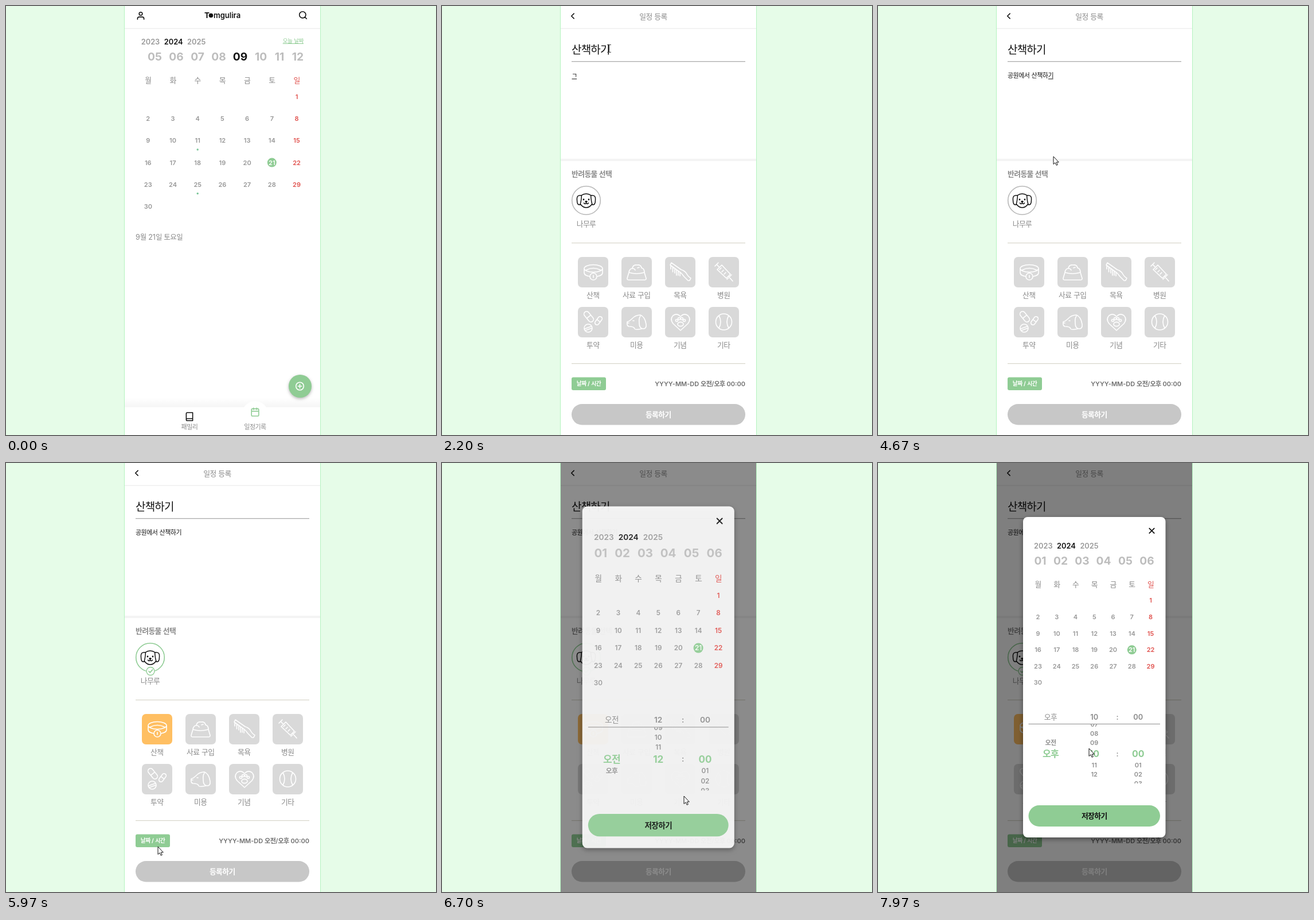
An HTML page with a canvas that plays this animation: 750 px wide and 747 px high, repeating every 8000 ms.

```html
<!DOCTYPE html>
<html lang="ko">
<head>
<meta charset="utf-8">
<title>일정 등록</title>
<style>
html, body { margin: 0; width: 100%; height: 100%; overflow: hidden; background: #e6fce8; }
canvas { display: block; width: 750px; height: 747px; }
</style>
</head>
<body>
<canvas id="stage"></canvas>
<script>
const LOOP = 8000, W = 750, H = 747;
const FONT = 'Inter, "Noto Sans CJK KR", "Noto Sans CJK", "Noto Sans", sans-serif';
const GREEN = '#8fcc94', GRAY = '#8a8a8a', PALE = '#bdbdbd', RED = '#e0504c';
const canvas = document.getElementById('stage');
const ctx = canvas.getContext('2d');
const dpr = window.devicePixelRatio || 1;
canvas.width = W * dpr;
canvas.height = H * dpr;

const clamp = v => Math.max(0, Math.min(1, v));
const two = n => String(n).padStart(2, '0');

// Hangul is set a little tighter than its default advance
const runs = s => s.match(/[ㄱ-힣]+|[^ㄱ-힣]+/g) || [];
function setRun(run, size) {
  ctx.letterSpacing = /[ㄱ-힣]/.test(run) ? -0.045 * size + 'px' : '0px';
}
function setFont(size, weight) { ctx.font = `${weight} ${size}px ${FONT}`; }
function measure(s, size) {
  let w = 0;
  for (const r of runs(s)) { setRun(r, size); w += ctx.measureText(r).width; }
  return w;
}
// y is the optical middle of the line
function text(s, x, y, size, color, weight = 400, align = 'center') {
  setFont(size, weight);
  const w = measure(s, size);
  if (align === 'center') x -= w / 2;
  if (align === 'right') x -= w;
  ctx.fillStyle = color;
  for (const r of runs(s)) {
    setRun(r, size);
    ctx.fillText(r, x, y + size * 0.36);
    x += ctx.measureText(r).width;
  }
  return w;
}
function rect(x, y, w, h, color) { ctx.fillStyle = color; ctx.fillRect(x, y, w, h); }
function round(x, y, w, h, r, color) {
  ctx.beginPath(); ctx.roundRect(x, y, w, h, r);
  ctx.fillStyle = color; ctx.fill();
}
function disc(x, y, r, color) {
  ctx.beginPath(); ctx.arc(x, y, r, 0, 7);
  ctx.fillStyle = color; ctx.fill();
}
function ring(x, y, r, color, lw) {
  ctx.beginPath(); ctx.arc(x, y, r, 0, 7);
  ctx.strokeStyle = color; ctx.lineWidth = lw; ctx.stroke();
}
function line(d, x, y, color, lw, scale = 1) {
  ctx.save();
  ctx.translate(x, y); ctx.scale(scale, scale);
  ctx.lineCap = ctx.lineJoin = 'round';
  ctx.strokeStyle = color; ctx.lineWidth = lw / scale;
  ctx.stroke(new Path2D(d));
  ctx.restore();
}
const circle = (x, y, r) => `M${x - r} ${y}a${r} ${r} 0 1 0 ${2 * r} 0a${r} ${r} 0 1 0 ${-2 * r} 0`;
// 24-unit icon around its middle
const icon = (d, x, y, color) => line(d, x - 8.4, y - 8.4, color, 1.6, 0.7);

const USER = 'M20 21v-2a4 4 0 0 0-4-4H8a4 4 0 0 0-4 4v2' + circle(12, 7, 4);
const SEARCH = circle(11, 11, 8) + 'M21 21L16.7 16.7';
const BOOK = 'M4 19.5A2.5 2.5 0 0 1 6.5 17H20M6.5 2H20V22H6.5A2.5 2.5 0 0 1 4 19.5V4.5A2.5 2.5 0 0 1 6.5 2Z';
const CALENDAR = 'M5 4H19a2 2 0 0 1 2 2V20a2 2 0 0 1-2 2H5a2 2 0 0 1-2-2V6a2 2 0 0 1 2-2ZM16 2v4M8 2v4M3 10H21';
const DOG = 'M-9-9Q0-15 9-9M-8-9Q-17-11-16-1Q-16 8-11 7Q-9 4-8-9M8-9Q17-11 16-1Q16 8 11 7Q9 4 8-9' +
  'M-10 6Q-6 12 0 12Q6 12 10 6M-4 4Q-2 7 0 4Q2 7 4 4M0 1V4';

const TILES = [
  ['산책', 'M11 20A16 6.5 0 0 1 43 20A16 6.5 0 0 1 11 20V28A16 7 0 0 0 21 34M43 20V28A16 7 0 0 1 33 34' +
    'M14 23Q27 16 40 23' + circle(27, 34, 6) + 'M27 32v4'],
  ['사료 구입', 'M13 27L10 37Q9.5 40 13 40H40Q43.5 40 43 37L40 27M13 27Q14 20 19 20Q20 13 27 14' +
    'Q34 13 35 19Q40 20 40 27Q26 31 13 27M19 20Q23 20 24 23M28 19l3-1'],
  ['목욕', 'M11 10L9 14L28 28Q30 30 33 34L40 41Q43 42 44 39L45 37Q40 34 37 28Q34 24 28 22Z' +
    'M10 16v5M13.5 18v8M17 21v7M20 23v9M23 26v6M26 28v5'],
  ['병원', 'M11 16l6-6M14 13l5 5M15 22L23 14L38 30L31 37ZM35 34L42 42M40 31L32 39M19 22l3-3M23 26l3-3M27 30l3-3'],
  ['투약', 'M11.7 15.3L19.3 24.5A4.5 4.5 0 0 0 26.3 18.7L18.7 9.5A4.5 4.5 0 0 0 11.7 15.3M15.5 19.9L22.5 14.1' +
    'M36.2 29.8L41.6 22.6A3.6 3.6 0 0 0 35.8 18.2L30.4 25.4A3.6 3.6 0 0 0 36.2 29.8M33.1 21.8l5.8 4.4' +
    circle(18, 37, 7) + 'M12 38l11-4M13 41l11-4'],
  ['미용', 'M10 26Q14 25 18 21Q24 14 33 14Q41 17 43 30Q44 38 38 38Q31 38 31 28Q30 20 33 16' +
    'M10 26Q9 33 13 34Q22 34 23 38Q24 40 30 39L36 38M20 24h2M10 28h3'],
  ['기념', 'M27 41L14 29Q8 21 14 15Q21 10 27 17Q33 10 40 15Q46 21 40 29Z' + circle(20.5, 23.5, 2) +
    circle(24.6, 20.5, 2) + circle(29.4, 20.5, 2) + circle(33.5, 23.5, 2) + 'M22 30a5 3.6 0 1 0 10 0a5 3.6 0 1 0-10 0'],
  ['기타', circle(26.5, 26, 14) + 'M18 15Q24 26 18 37M35 15Q29 26 35 37']
];

// [time, text]; the last syllable stays underlined while it is composed
const TITLE = [[790, 'ㅅ'], [870, '사'], [940, '산'], [1100, '산ㅊ'], [1180, '산채'], [1260, '산책'],
  [1420, '산책ㅎ'], [1670, '산책하'], [1740, '산책하기']];
const MEMO = [[2200, 'ㄱ'], [2280, '고'], [2430, '공'], [2590, '공ㅇ'], [2750, '공워'], [2830, '공원'],
  [2990, '공원ㅇ'], [3160, '공원에'], [3230, '공원엣'], [3310, '공원에서'], [3390, '공원에서 '],
  [3470, '공원에서 사'], [3550, '공원에서 산'], [3720, '공원에서 산ㅊ'], [3870, '공원에서 산채'],
  [3950, '공원에서 산책'], [4120, '공원에서 산책ㅎ'], [4200, '공원에서 산책하'],
  [4280, '공원에서 산책학'], [4360, '공원에서 산책하기']];
const typed = (keys, t) => keys.reduce((s, k) => t >= k[0] ? k[1] : s, '');

const FORM = 310, TAB = 1900, PET = 4990, TILE = 5570, MODAL = 6530;

// pointer stops: time, x, y
const STOPS = [[150, 516, 668], [310, 512, 658], [630, 291, 74], [4590, 291, 74], [4670, 306, 262],
  [4990, 254, 342], [5310, 262, 464], [5490, 262, 464], [5970, 265, 668], [6210, 265, 668],
  [6370, 261, 657], [6530, 261, 657], [6690, 422, 580], [7090, 298, 526], [7330, 296, 522],
  [7570, 363, 494], [7730, 363, 494], [7810, 368, 497]];

function held(t) {
  const phase = t < 1500 ? 70 : t < 5400 ? 30 : 50;
  return Math.floor((t - phase) / 80) * 80 + phase;
}
function pointerAt(t) {
  const i = STOPS.findIndex(s => s[0] > t);
  if (i < 0) return STOPS[STOPS.length - 1].slice(1);
  if (i === 0) return STOPS[0].slice(1);
  const [t0, x0, y0] = STOPS[i - 1], [t1, x1, y1] = STOPS[i];
  const p = (t - t0) / (t1 - t0), e = p * p * (3 - 2 * p);
  return [x0 + (x1 - x0) * e, y0 + (y1 - y0) * e];
}
function drawPointer(t) {
  const [x, y] = pointerAt(held(t));
  if (t >= FORM && y < 140) {
    line('M-3-6.5H3M0-6.5V6.5M-3 6.5H3', 291.5 + x - 291, y, '#444', 1);
    return;
  }
  ctx.save();
  ctx.translate(x, y);
  const p = new Path2D('M0 0V13.5L3 10.8L5.2 15.4L7.3 14.4L5.2 10H9.3Z');
  ctx.fillStyle = '#fff'; ctx.fill(p);
  ctx.strokeStyle = '#111'; ctx.lineWidth = 1; ctx.stroke(p);
  ctx.restore();
}

function drawMonth(x0, dx, headY, y0, dy, headSize) {
  [...'월화수목금토일'].forEach((d, i) => text(d, x0 + i * dx, headY, headSize, i === 6 ? RED : GRAY));
  for (let day = 1; day <= 30; day++) {
    const n = day + 5, col = n % 7, x = x0 + col * dx, y = y0 + Math.floor(n / 7) * dy;
    if (day === 21) disc(x, y, 8, GREEN);
    text(String(day), x, y, 11, day === 21 ? '#fff' : col === 6 ? RED : '#979797', 600);
  }
}
function drawYears(x, y) {
  [2023, 2024, 2025].forEach((n, i) =>
    text(String(n), x + i * 40.1, y, 12.8, n === 2024 ? '#111' : '#999', 600));
}

function drawPhone() {
  rect(0, 0, W, H, '#e6fce8');
  rect(206, 0, 343, H, '#b4f3bf');
  rect(207, 0, 341, H, '#fff');
  rect(207, 38.5, 341, 1.5, '#f0f0f0');
}

function drawCalendar() {
  icon(USER, 235, 17, '#111');
  icon(SEARCH, 518, 16, '#111');
  text('T', 346, 16, 13.5, '#111', 700, 'left');
  disc(357.5, 16.5, 3.8, '#111');
  text('mgulira', 362, 16, 13, '#111', 600, 'left');

  drawYears(252, 62);
  const w = text('오늘 날짜', 519, 60.5, 9.6, GREEN, 400, 'right');
  rect(519 - w, 65, w, 1, GREEN);
  [259.5, 297, 334, 371, 408.5, 444.5, 477, 509].forEach((x, i) =>
    text(two(i + 5), x, 88, 19.2, i === 4 ? '#111' : PALE, 700));
  drawMonth(247.8, 43.2, 129, 158, 38.2, 12.8);
  disc(334.2, 250, 1.7, '#7cc79a');
  disc(334.2, 326.5, 1.7, '#7cc79a');
  text('9월 21일 토요일', 226, 402, 12.5, GRAY, 400, 'left');

  const g = ctx.createLinearGradient(0, 682, 0, 699);
  g.addColorStop(0, '#fff'); g.addColorStop(1, '#f5f5f5');
  rect(207, 682, 341, 17, g);
  rect(207, 698.5, 341, 49, '#fff');
  disc(434.5, 711, 23, '#fff');
  icon(BOOK, 320, 715, '#111');
  icon(CALENDAR, 434.5, 707, GREEN);
  text('패밀리', 320, 733.5, 11, GRAY);
  text('일정기록', 434.5, 733.5, 11, GRAY);

  ctx.save();
  ctx.shadowColor = 'rgba(0,0,0,.28)'; ctx.shadowBlur = 5 * dpr; ctx.shadowOffsetY = 2 * dpr;
  disc(513, 662, 20, GREEN);
  ctx.restore();
  line(circle(0, 0, 6.8) + 'M-3.3 0H3.3M0-3.3V3.3', 512.5, 662, '#fff', 1.6);
}

function drawTyped(s, y, size, under, composing) {
  text(s, 226, y, size, '#111', 400, 'left');
  if (!composing || !s || s.endsWith(' ')) return;
  const end = 226 + measure(s, size), start = 226 + measure(s.slice(0, -1), size);
  rect(start + 0.5, under, end - start - 1, 1, '#111');
}

function drawForm(t) {
  line('M4.5 0L0 4.3L4.5 8.6', 225.7, 13.2, '#111', 1.6);
  text('일정 등록', 368.5, 18, 12.8, GRAY);
  drawTyped(typed(TITLE, t), 76, 19, 87, t < TAB);
  rect(226, 96, 303, 1.3, '#adadad');
  if (t < 2200) {
    text('메모', 226, 120.5, 11, '#7a7a7a', 400, 'left');
    text('어떤 일정인지 자세하게 기록하실 수 있어요!', 226, 133, 11, '#7a7a7a', 400, 'left');
    if (t >= TAB) rect(226, 115, 1, 13, '#111');
  } else {
    drawTyped(typed(MEMO, t), 121, 11, 126.5, t < PET);
  }
  rect(207, 266, 341, 4, '#f4f4f4');

  const chosen = t >= PET;
  text('반려동물 선택', 226, 292, 12.8, GRAY, 700, 'left');
  ring(251.5, 338.5, 24.8, chosen ? GREEN : '#b8b8b8', 1.6);
  line(DOG, 251.5, 339, '#111', 1.5);
  disc(247, 337, 1.4, '#111');
  disc(256, 337, 1.4, '#111');
  ctx.beginPath(); ctx.ellipse(251.5, 340.5, 2.2, 1.5, 0, 0, 7); ctx.fill();
  if (chosen) {
    disc(252, 362.5, 7.5, '#fff');
    ring(252, 362.5, 7, GREEN, 1.4);
    line('M-3 0L-.8 2.4L3.6-2.6', 252, 362.5, GREEN, 1.6);
  }
  text('나무루', 251.5, 379, 12.8, GRAY);
  rect(226, 412, 303, 1.2, '#d8d6ca');

  TILES.forEach(([name, d], i) => {
    const x = 237 + (i % 4) * 76, y = i < 4 ? 437 : 524;
    round(x, y, 53, 53, 7, i === 0 && t >= TILE ? '#ffbf62' : '#d9d9d9');
    line(d, x, y, '#fff', 1.6);
    text(name, x + 26.2, y + 66.5, 12.8, GRAY);
  });
  rect(226, 622, 303, 1.2, '#d8d6ca');

  round(226, 646.5, 60, 22.5, 3, GREEN);
  text('날짜 / 시간', 256, 657.5, 9.8, '#fff', 700);
  text('YYYY-MM-DD 오전/오후 00:00', 529, 658.5, 11, '#6e6e6e', 600, 'right');
  round(226, 693, 303, 36.5, 18.2, '#c7c7c7');
  text('등록하기', 377.3, 711, 12.8, '#fff', 700);
}

function drawWheel(items, pos, x) {
  items.forEach((s, i) => {
    const d = i - pos, a = Math.abs(d);
    if (a > 3.9) return;
    const y = 506.5 + Math.sign(d) * (a < 1 ? 19.5 * a : 19.5 + 16 * (a - 1));
    const on = a < 0.5;
    text(s, x, y, on ? 16 : 11, on ? GREEN : '#8f8f8f', on ? 700 : 600);
  });
}

const HALVES = ['오전', '오후'];
const HOURS = Array.from({ length: 12 }, (_, i) => two(i + 1));
const MINUTES = Array.from({ length: 60 }, (_, i) => two(i));

function drawModal(t) {
  const at = held(t), s = (at - 6496) / 1000;
  const p = clamp(s / 0.3), fade = 1 - Math.pow(1 - Math.pow(p, 1.25), 2.8);
  const scale = 1 - Math.exp(-15 * s) * (Math.cos(18 * s) + 0.833 * Math.sin(18 * s));
  const half = clamp((at - 7090) / 160);
  const hour = 11 - 2 * clamp((at - 7730) / 240);

  rect(207, 0, 341, H, `rgba(0,0,0,${0.5 * fade})`);
  ctx.save();
  ctx.translate(377.3, 373); ctx.scale(scale, scale); ctx.translate(-377.3, -373);
  ctx.save();
  ctx.globalAlpha = Math.max(0.9, fade);
  ctx.shadowColor = `rgba(0,0,0,${0.4 * fade})`; ctx.shadowBlur = 8 * dpr; ctx.shadowOffsetY = 3 * dpr;
  round(253, 94, 248.5, 558, 8, '#fff');
  ctx.restore();

  ctx.globalAlpha = fade;
  line('M-4.2-4.2L4.2 4.2M4.2-4.2L-4.2 4.2', 477.5, 118, '#111', 1.8);
  drawYears(288.3, 144.5);
  [283, 318.5, 356, 393.5, 431.5, 469].forEach((x, i) => text(two(i + 1), x, 170, 19.2, PALE, 700));
  drawMonth(279, 32.75, 211.5, 239.5, 28.6, 12.8);

  text(HALVES[Math.round(half)], 301, 442, 12.8, GRAY, 500);
  text(HOURS[Math.round(hour)], 377.2, 442, 12.8, GRAY, 600);
  text(':', 417.5, 442, 12.8, GRAY, 600);
  text('00', 453.8, 442, 12.8, GRAY, 600);
  rect(262.5, 454, 229.5, 1, '#8f8f8f');

  ctx.save();
  ctx.beginPath(); ctx.rect(260, 455, 235, 103); ctx.clip();
  drawWheel(HALVES, half, 301);
  drawWheel(HOURS, hour, 377.2);
  text(':', 417.5, 506.5, 12.8, GRAY, 600);
  drawWheel(MINUTES, 0, 453.8);
  ctx.restore();

  round(262.5, 596, 229.5, 37, 18.5, GREEN);
  text('저장하기', 377.3, 614.5, 12.8, '#111', 700);
  ctx.restore();
}

const start = performance.now();
function frame() {
  const t = (performance.now() - start) % LOOP;
  ctx.setTransform(dpr, 0, 0, dpr, 0, 0);
  drawPhone();
  if (t < FORM) drawCalendar(); else drawForm(t);
  if (t >= MODAL) drawModal(t);
  if (t >= 150) drawPointer(t);
  requestAnimationFrame(frame);
}
frame();
</script>
</body>
</html>
```
